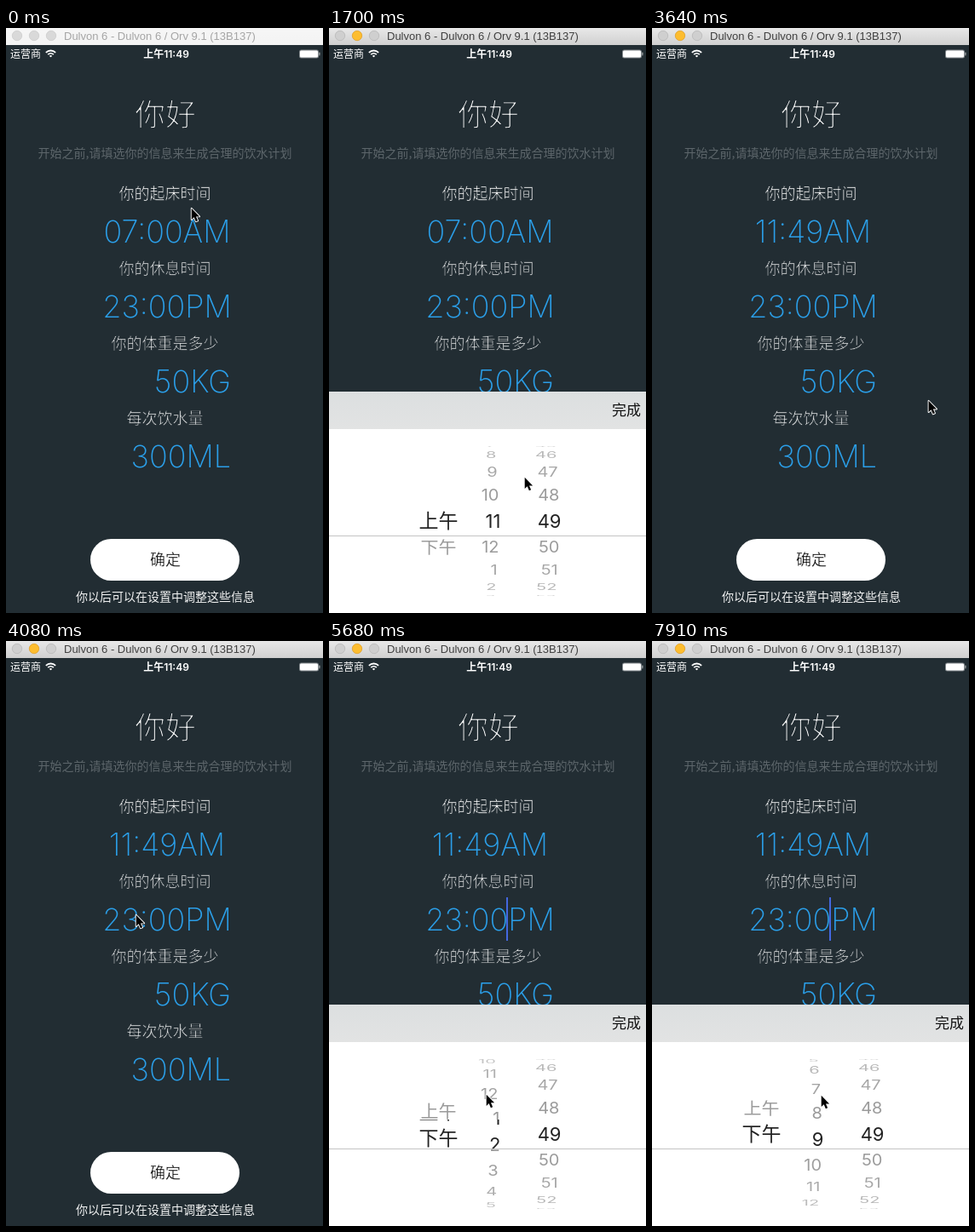
These frames come from a looping animation (372 px wide and 687 px high, 8 s). An HTML page with a canvas:

```html
<!DOCTYPE html>
<html lang="zh">
<head>
<meta charset="utf-8">
<style>
html, body { margin: 0; width: 372px; height: 687px; overflow: hidden; background: #222d33; }
canvas { display: block; }
</style>
</head>
<body>
<canvas id="stage" width="372" height="687"></canvas>
<script>
const ctx = document.getElementById('stage').getContext('2d');
const LOOP = 8000, TICK = 148, PHASE = 55;
const CJK = '"Noto Sans CJK SC", "Noto Sans CJK", sans-serif';
const INTER = 'Inter, "Noto Sans CJK SC", sans-serif';
const ARIAL = '"Liberation Sans", sans-serif';
const BG = '#222d33', BLUE = '#2b9fe9';
const MID = 579, BAND = 562, BAND_H = 35, RADIUS = 90, ANGLE = 0.347, ROW = 32;

// Pointer moves; the ones marked drag also turn the hour drum.
const moves = [
  { from: 150, to: 440, x: 184, y: 252 },
  { from: 1380, to: 1680, x: 229, y: 527 },
  { from: 1700, to: 2300, x: 190, y: 582 },
  { from: 2350, to: 3010, x: 346, y: 452 },
  { from: 3550, to: 4050, x: 152, y: 321 },
  { from: 4900, to: 5350, x: 186, y: 615 },
  { from: 5400, to: 5820, x: 183, y: 490, drag: true },
  { from: 5850, to: 6150, x: 188, y: 599 },
  { from: 6250, to: 6860, x: 199, y: 494, drag: true },
  { from: 7400, to: 7560, x: 196, y: 617 },
  { from: 7560, to: 7895, x: 198, y: 533, drag: true }
];

const ramp = (t, a, b) => Math.min(1, Math.max(0, (t - a) / (b - a)));
const smooth = (t, a, b) => { const p = ramp(t, a, b); return p * p * (3 - 2 * p); };
const sheetUp = t => smooth(t, 900, 1350) - smooth(t, 3130, 3600) + smooth(t, 4330, 4780);

function pose(t) {
  let x = 217, y = 211, hour = 11;
  for (const m of moves) {
    const p = ramp(t, m.from, m.to), dy = (m.y - y) * p;
    x += (m.x - x) * p;
    y += dy;
    if (m.drag) hour -= dy / ROW;
    if (p < 1) break;
  }
  return { x, y, hour };
}

function text(str, x, y, font, color, align = 'center') {
  ctx.font = font;
  ctx.fillStyle = color;
  ctx.textAlign = align;
  ctx.fillText(str, x, y);
}

// Text slimmed by an outline in the colour behind it.
function thinText(str, x, y, size, color, trim, behind = BG) {
  text(str, x, y, size + 'px ' + CJK, color);
  ctx.strokeStyle = behind;
  ctx.lineWidth = trim;
  ctx.lineJoin = 'round';
  ctx.strokeText(str, x, y);
}

function rect(x, y, w, h, color) {
  ctx.fillStyle = color;
  ctx.fillRect(x, y, w, h);
}

function pill(x, y, w, h, r, color) {
  ctx.beginPath();
  ctx.roundRect(x, y, w, h, r);
  ctx.fillStyle = color;
  ctx.fill();
}

function shade(y, h, top, bottom) {
  const g = ctx.createLinearGradient(0, y, 0, y + h);
  g.addColorStop(0, top);
  g.addColorStop(1, bottom);
  rect(0, y, 372, h, g);
}

function titleBar(active) {
  if (active) shade(0, 20, '#e8e8e8', '#d0d0d0');
  else shade(0, 20, '#f6f6f6', '#f3f3f3');
  for (let i = 0; i < 3; i++) {
    const lit = active && i === 1;
    ctx.beginPath();
    ctx.arc(13 + 20 * i, 9, 5.7, 0, 7);
    ctx.fillStyle = lit ? '#fdbd2f' : active ? '#cfcfcf' : '#d9d9d9';
    ctx.fill();
    ctx.strokeStyle = lit ? '#e0a02a' : active ? '#b9b9b9' : '#cccccc';
    ctx.lineWidth = 0.8;
    ctx.stroke();
  }
  text('Dulvon 6 - Dulvon 6 / Orv 9.1 (13B137)', 68, 14, '13px ' + ARIAL, active ? '#404040' : '#a5a5a5', 'left');
}

function statusBar() {
  text('运营商', 5, 35, '12px ' + CJK, '#fff', 'left');
  text('上午11:49', 188, 35, '600 12px ' + INTER, '#fff');
  ctx.strokeStyle = '#fff';
  ctx.lineWidth = 1.8;
  for (let r = 1.4; r < 9; r += 3.3) {
    ctx.beginPath();
    ctx.arc(52.5, 34.5, r, -Math.PI * 0.75, -Math.PI * 0.25);
    ctx.stroke();
  }
  pill(344, 25.5, 23, 10, 2.5, '#82888c');
  pill(345, 26.5, 21, 8, 1.5, '#fff');
  pill(367.2, 28.5, 1.3, 4, 1, '#9a9fa2');
}

function form(wake) {
  thinText('你好', 187, 115, 36, '#fff', 1.7);
  text('开始之前,请填选你的信息来生成合理的饮水计划', 186.5, 152, '14px ' + CJK, '#5d666b');
  ['你的起床时间', '你的休息时间', '你的体重是多少', '每次饮水量'].forEach((s, i) =>
    thinText(s, 186.5, 201 + i * 88, 18, i ? '#e0e2e3' : '#fff', 0.6));
  const big = '200 36px ' + INTER;
  [wake, '23:00PM', '50KG', '300ML'].forEach((s, i) =>
    text(s, i < 2 ? 189 : 264, 252 + i * 88, big, BLUE, i < 2 ? 'center' : 'right'));
  pill(99, 600, 175, 49, 24.5, '#fff');
  thinText('确定', 187, 631, 18, '#000', 0.3, '#fff');
  text('你以后可以在设置中调整这些信息', 187, 673, '14px ' + CJK, '#f2f3f3');
}

function clipped(rects, paint) {
  ctx.save();
  ctx.beginPath();
  rects.forEach(r => ctx.rect(...r));
  ctx.clip();
  paint();
  ctx.restore();
}

// One picker column: small rows around the drum, large ones inside the band.
function wheel(value, x, align, family, size, label, min, max) {
  const rows = (px, color, pull) => {
    const last = Math.min(max, Math.floor(value) + 5);
    for (let k = Math.max(min, Math.floor(value) - 4); k <= last; k++) {
      const a = (k - value) * ANGLE;
      if (Math.abs(a) > 1.5) continue;
      ctx.save();
      ctx.translate(x - pull * Math.abs(Math.sin(a)), MID + RADIUS * Math.sin(a));
      ctx.scale(1, Math.cos(a));
      ctx.globalAlpha = 0.35 + 0.65 * Math.cos(a);
      text(label(k), 0, px * 0.36, px + 'px ' + family, color, align);
      ctx.restore();
    }
  };
  const below = BAND + BAND_H;
  clipped([[0, 491, 372, BAND - 491], [0, below, 372, 667 - below]],
    () => rows(size - 2, '#979797', align === 'right' ? 6 : 0));
  clipped([[0, BAND, 372, BAND_H]], () => rows(size, '#222', 0));
}

function keyboard(t, hour) {
  const up = sheetUp(t);
  if (up <= 0) return;
  ctx.save();
  ctx.translate(0, Math.round(260 * (1 - up)));
  shade(427, 44, '#dcdfe0', '#e2e3e3');
  text('完成', 366, 455, '17px ' + CJK, '#111', 'right');
  rect(0, 471, 372, 216, '#fff');
  const digits = INTER.replace('Inter', 'Inter');
  wheel(smooth(t, 5500, 5740), 128.5, 'center', CJK, 23, k => k ? '下午' : '上午', 0, 1);
  wheel(hour, 201.5, 'right', digits, 22, k => (k + 11) % 12 + 1, 1, 99);
  wheel(49, 272.5, 'right', digits, 22, k => k, 0, 59);
  rect(0, 596, 372, 1, '#c4c4c4');
  ctx.restore();
}

function caret(t) {
  const blink = start => Math.floor((t - start) / 500) % 2 === 0;
  if (t >= 1000 && t < 3100 && blink(1000)) rect(207, 213, 2, 51, '#4468e0');
  if (t >= 4350 && (t > 5330 || blink(4350))) rect(208, 301, 2, 51, '#4468e0');
}

function arrow(x, y) {
  ctx.save();
  ctx.translate(x + 0.7, y + 0.8);
  ctx.scale(0.94, 0.94);
  ctx.beginPath();
  [[0, 0], [0, 14], [3.2, 11], [5.5, 16.4], [7.9, 15.4], [5.6, 10.2], [10, 10.2]].forEach(p => ctx.lineTo(...p));
  ctx.closePath();
  ctx.lineJoin = 'round';
  ctx.lineWidth = 2;
  ctx.strokeStyle = '#fff';
  ctx.stroke();
  ctx.fillStyle = '#000';
  ctx.fill();
  ctx.restore();
}

// The screen refreshes once per tick.
function draw(now) {
  const time = now % LOOP;
  const t = PHASE + TICK * Math.floor((time - PHASE) / TICK);
  const { x, y, hour } = pose(t);
  rect(0, 0, 372, 687, BG);
  statusBar();
  form(t < 3100 ? '07:00AM' : '11:49AM');
  caret(t);
  keyboard(t, hour);
  titleBar(time >= 710);
  arrow(x, y);
}

const begin = performance.now();
function frame() {
  draw(performance.now() - begin);
  requestAnimationFrame(frame);
}
frame();
</script>
</body>
</html>
```
